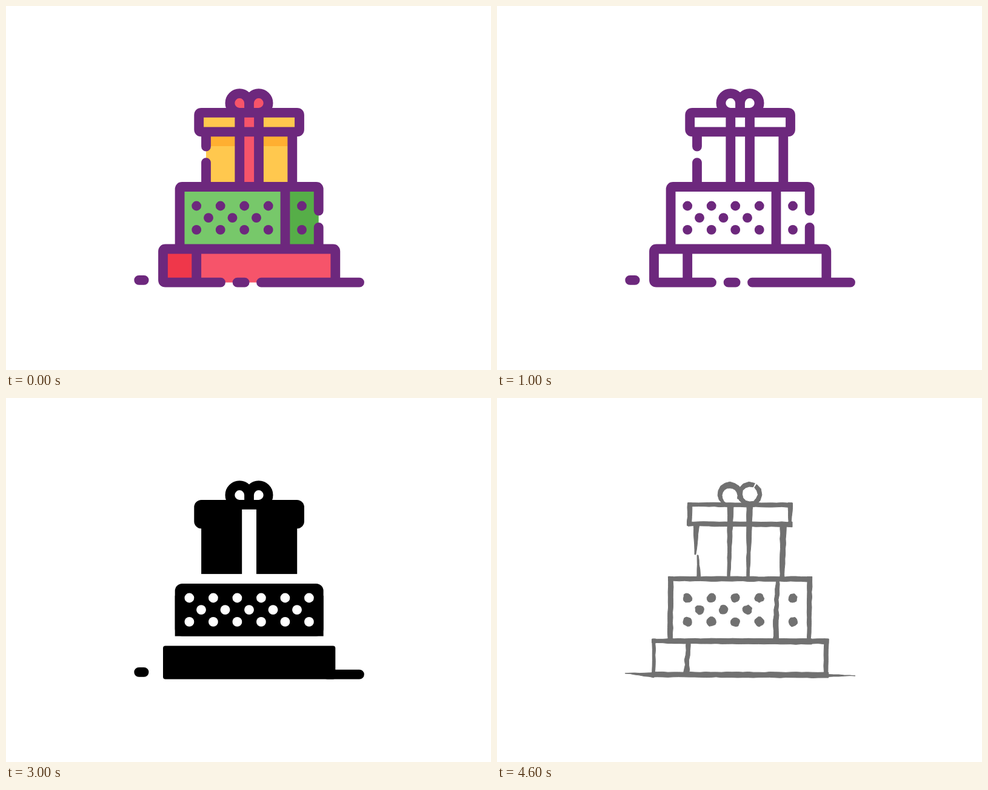
An HTML page for the animation above (5 s loop, 800 by 600 pixels).

```html
<!DOCTYPE html>
<html lang="en">
<head>
<meta charset="utf-8">
<title>Gift stack in five styles</title>
<style>
  html, body { margin: 0; width: 100%; height: 100%; overflow: hidden; background: #fff; }
  svg { display: block; width: 100%; height: 100%; }
</style>
</head>
<body>
<svg id="stage" viewBox="0 0 800 600"></svg>
<script>
const STYLE_MS = 1000;
const PURPLE = '#6d287d', ROSE = '#f6546a', RED = '#ef374a', YELLOW = '#ffc84e', ORANGE = '#ffaf31';
const GREEN = '#77c86a', FOREST = '#56ae48', MOSS = '#428e36', GRAY = '#717171';

// Centre lines shared by all styles; HALF is half the icon's line width.
const HALF = 7.9;
const LID = { x1: 318.2, y1: 175.8, x2: 484, y2: 207.4 };
const BODY = { x1: 330, y1: 207.4, x2: 472.3, y2: 298 };
const MID = { x1: 286.6, y1: 298, x2: 515.7, y2: 400.5, split: 460.5 };
const BASE = { x1: 259, y1: 400.5, x2: 543.3, y2: 455.7, split: 314.2 };
const RIBBON = { x1: 385.3, x2: 417 };
const GROUND = { x1: 211.3, x2: 590.8 };
const BOW = 'M401 175.8V160a15.8 15.8 0 1 0-15.8 15.8ZM401 175.8V160a15.8 15.8 0 1 1 15.8 15.8Z';

const rect = (x1, y1, x2, y2, fill, r = 0) =>
  `<rect x="${x1}" y="${y1}" width="${x2 - x1}" height="${y2 - y1}" rx="${r}" fill="${fill}"/>`;
const fillBox = (b, fill, r) => rect(b.x1, b.y1, b.x2, b.y2, fill, r);
const line = (d, color) => `<path d="${d}" fill="none" stroke="${color}" stroke-width="${2 * HALF}"
  stroke-linecap="round" stroke-linejoin="round"/>`;
const bar = (x, y1, y2) => `M${x} ${y1}V${y2}`;
const dash = (y, x1, x2) => `M${x1} ${y}H${x2}`;
const arch = (b, leftEnd, rightEnd) =>
  `M${b.x1} ${leftEnd}V${b.y1 + 4}q0-4 4-4H${b.x2 - 4}q4 0 4 4V${rightEnd}`;
const range = (n, start, step = 39.5) => Array.from({ length: n }, (_, i) => start + i * step);

// Two equal rows of dots with a staggered one between them.
function dotRows(outer, inner, y) {
  return [...outer.map(x => [x, y]), ...inner.map(x => [x, y + 19.7]), ...outer.map(x => [x, y + 39.4])];
}
const dots = (centres, fill) =>
  centres.map(([x, y]) => `<circle cx="${x}" cy="${y}" r="${HALF}" fill="${fill}"/>`).join('');
const lineDots = dotRows([...range(4, 314.2), 488], range(3, 334), 329.5);

function outline() {
  const strokes = [
    arch(BASE, BASE.y2 - 4, BASE.y2), `M${BASE.x1} ${BASE.y2 - 4}q0 4 4 4H354`,
    dash(BASE.y2, 381.6, 393.6), dash(BASE.y2, 421, 583), dash(451.8, 219.2, 227.7),
    arch(MID, MID.y2, 337.6), bar(MID.x2, 364.8, MID.y2),
    arch(LID, LID.y2 - 4, LID.y2 - 4), `M${LID.x1} ${LID.y2 - 4}q0 4 4 4H${LID.x2 - 4}q4 0 4-4`,
    bar(BASE.split, BASE.y1, BASE.y2), bar(MID.split, MID.y1, MID.y2),
    bar(BODY.x1, BODY.y1, 231.6), bar(BODY.x1, 258.1, BODY.y2), bar(BODY.x2, BODY.y1, BODY.y2),
    bar(RIBBON.x1, LID.y1, BODY.y2), bar(RIBBON.x2, LID.y1, BODY.y2), BOW
  ];
  return line(strokes.join(''), PURPLE) + dots(lineDots, PURPLE);
}

function filledOutline() {
  return `<path d="${BOW}" fill="${ROSE}"/>` +
    fillBox(BODY, YELLOW) + fillBox({ ...BODY, y2: 231 }, ORANGE) + fillBox(LID, YELLOW, 4) +
    rect(RIBBON.x1, LID.y1, RIBBON.x2, BODY.y2, ROSE) +
    fillBox({ ...MID, x2: MID.split }, GREEN) + fillBox({ ...MID, x1: MID.split }, FOREST) +
    fillBox({ ...BASE, x2: BASE.split }, RED) + fillBox({ ...BASE, x1: BASE.split }, ROSE) + outline();
}

// Rounded box in two colours: the side panel is clipped out of a second full box.
function splitBox(b, r, left, right) {
  const cut = b.split - b.x1, end = b.x2 - b.split;
  return fillBox(b, left, r) +
    `<g style="clip-path: inset(0 0 0 ${cut}px)">${fillBox(b, right, r)}</g>`;
}

function flat() {
  const top = MID.y1 - HALF;
  const slab = { ...MID, x1: MID.x1 - HALF, x2: MID.x2 + HALF, y1: top };
  const foot = { ...BASE, x1: BASE.x1 - HALF, x2: BASE.x2 + HALF, y2: BASE.y2 + HALF };
  return line(BOW, ROSE) +
    fillBox({ ...BODY, y2: top }, YELLOW) + fillBox({ ...BODY, y2: 223 }, ORANGE) + fillBox(LID, YELLOW, 8) +
    rect(389.2, LID.y1, 413, top, ROSE) +
    splitBox(slab, 11, GREEN, FOREST) +
    dots(dotRows([...range(4, 310.2), 491.7], range(3, 330), 325.6), MOSS) +
    line(dash(BASE.y2, 530, 582.9) + dash(BASE.y2, 219.2, 228), ROSE) + splitBox(foot, 12, RED, ROSE);
}

function solid() {
  const left = MID.x1 - HALF, right = MID.x2 + HALF, top = MID.y1 + HALF, bottom = MID.y2 - HALF;
  return line(BOW, '#000') +
    rect(LID.x1 - HALF, LID.y1 - HALF, LID.x2 + HALF, LID.y2 + HALF, '#000', 12) +
    rect(BODY.x1 - HALF, BODY.y1, BODY.x2 + HALF, BODY.y2 - HALF, '#000') +
    rect(389.2, LID.y1 + HALF, 413, BODY.y2, '#fff') +
    rect(left, top, right, bottom, '#000', 12) + rect(left, top + 20, right, bottom, '#000') +
    dots(dotRows(range(6, 302.4), range(5, 322), 329.5), '#fff') +
    rect(BASE.x1, BASE.y1 + HALF, BASE.x2, BASE.y2 + HALF, '#000', 4) +
    line(dash(BASE.y2, 530, 582.9) + dash(451.8, 219.2, 227.6), '#000');
}

let seed = 11;
function random() {
  seed = (seed * 16807) % 2147483647;
  return seed / 2147483647;
}
const jitter = size => (random() * 2 - 1) * size;
const mix = (a, b, t) => a + (b - a) * t;
const polygon = points => `<polygon points="${points.map(p => p.map(v => v.toFixed(1)).join()).join(' ')}"
  fill="${GRAY}" stroke="${GRAY}" stroke-width="1" stroke-linejoin="round"/>`;

// Ragged stroke along pointAt(t), t from 0 to 1; the polygon's own outline adds 1 to the width.
function brush(pointAt, widthAt, length, rough = 0.5) {
  const steps = Math.ceil(length / 9), left = [], right = [];
  for (let i = 0; i <= steps; i++) {
    const t = i / steps, [x, y] = pointAt(t);
    const [ax, ay] = pointAt(t - 0.01), [bx, by] = pointAt(t + 0.01);
    const size = Math.hypot(bx - ax, by - ay), nx = (ay - by) / size, ny = (bx - ax) / size;
    const half = Math.max(0, widthAt(t) - 1) / 2;
    const l = half + jitter(rough), r = half + jitter(rough);
    left.push([x + nx * l, y + ny * l]);
    right.unshift([x - nx * r, y - ny * r]);
  }
  return polygon([...left, ...right]);
}

function stroke(x1, y1, x2, y2, w1, w2 = w1, rough) {
  return brush(t => [mix(x1, x2, t), mix(y1, y2, t)], t => mix(w1, w2, t), Math.hypot(x2 - x1, y2 - y1), rough);
}

function ring(cx, cy, r, from, to, swell) {
  const angleAt = t => mix(from, to, t) * Math.PI / 180;
  return brush(t => [cx + r * Math.cos(angleAt(t)), cy + r * Math.sin(angleAt(t))],
    t => 8 - swell * Math.sin(angleAt(t)), 100);
}

function roughBox({ x1, y1, x2, y2 }, w, leftWidth = w) {
  const o = w / 2 - 1;
  return stroke(x1, y1 - o, x1 - 1, y2 + o, leftWidth) + stroke(x2, y1 - o, x2 - 1, y2 + o, w, w - 2) +
    stroke(x1 - o, y1, x2 + o, y1 + 0.5, w - 1, w) + stroke(x1 - o, y2, x2 + o, y2 + 1, w, w + 1);
}

function blob([x, y]) {
  const turn = random();
  return polygon(range(13, 0, 1).map(i => {
    const angle = (i + turn) / 13 * 2 * Math.PI, r = 7.4 + jitter(1);
    return [x + r * Math.cos(angle), y + r * Math.sin(angle)];
  }));
}

function sketch() {
  const ground = BASE.y2 + 1;
  return ring(384, 160, 16.5, 110, 385, 3) + ring(417, 158.5, 16.5, -55, 295, 0) +
    roughBox(LID, 8) + roughBox(MID, 9) + roughBox(BASE, 9, 6) +
    stroke(BODY.x1 - 1, BODY.y1, BODY.x1 - 3, 258, 11, 3) + stroke(BODY.x1 + 1, 259, BODY.x1 + 3, BODY.y2, 3, 7) +
    stroke(BODY.x2, BODY.y1, BODY.x2 - 2, BODY.y2, 11, 8) +
    [RIBBON.x1, RIBBON.x2].map(x => stroke(x, LID.y1, x - 3, BODY.y2, 11, 5)).join('') +
    stroke(MID.split + 2, MID.y1, MID.split - 1, MID.y2, 6, 10, 1.2) +
    stroke(BASE.split + 2, BASE.y1, BASE.split - 2, BASE.y2, 7, 9, 1.2) +
    stroke(GROUND.x1, ground - 3, BASE.x1, ground, 1, 9) + stroke(BASE.x2 - 50, ground, GROUND.x2, ground + 1, 9, 1) +
    lineDots.map(blob).join('');
}

const stage = document.getElementById('stage');
stage.innerHTML = [filledOutline(), outline(), flat(), solid(), sketch()].map(art => `<g>${art}</g>`).join('');
const layers = [...stage.children];

function show(time) {
  const current = Math.floor(time / STYLE_MS) % layers.length;
  layers.forEach((layer, i) => layer.setAttribute('display', i === current ? 'inline' : 'none'));
}

const start = performance.now();
function tick() {
  show(performance.now() - start);
  requestAnimationFrame(tick);
}
tick();
</script>
</body>
</html>
```
